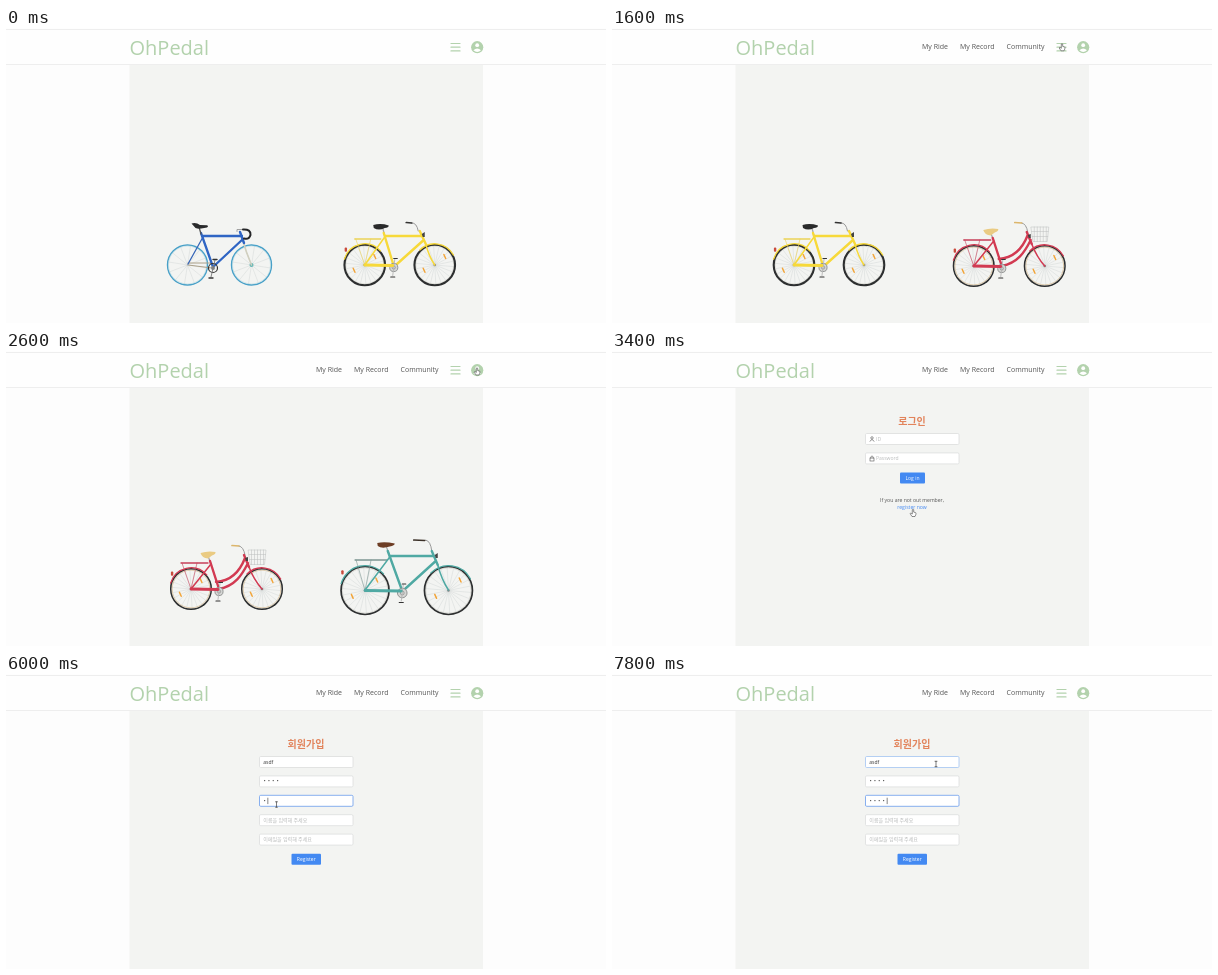
An HTML page for the animation above (8000 ms loop, 600 by 295 pixels).

```html
<!DOCTYPE html>
<html lang="ko">
<head>
<meta charset="utf-8">
<title>Bike club</title>
<style>
html, body { margin: 0; width: 100%; height: 100%; overflow: hidden; background: #fdfdfd; }
svg { display: block; width: 100%; height: 100%; }
text { font-family: "Open Sans", "Noto Sans CJK KR", "Noto Sans CJK JP", sans-serif; white-space: pre; }
</style>
</head>
<body>
<svg id="stage" viewBox="0 0 600 295"></svg>
<script>
const LOOP = 8000, SLOT = 176.75;
const stage = document.getElementById('stage');

// ---------- drawing helpers ----------
const line = (d, color, width = 1) =>
  `<path d="${d}" fill="none" stroke="${color}" stroke-width="${width}" stroke-linecap="round" stroke-linejoin="round"/>`;
const shape = (d, color) => `<path d="${d}" fill="${color}"/>`;
const ring = (x, y, r, color, width) =>
  `<circle cx="${x}" cy="${y}" r="${r}" fill="none" stroke="${color}" stroke-width="${width}"/>`;
const disc = (x, y, r, color) => `<circle cx="${x}" cy="${y}" r="${r}" fill="${color}"/>`;
const box = (x, y, w, h, fill, extra = '') =>
  `<rect x="${x}" y="${y}" width="${w}" height="${h}" fill="${fill}" ${extra}/>`;
const label = (str, x, y, size, color, extra = '') =>
  `<text x="${x}" y="${y}" font-size="${size}" fill="${color}" ${extra}>${str}</text>`;
const centred = 'text-anchor="middle"';
const group = (id, content, extra = '') => `<g id="${id}" ${extra}>${content}</g>`;

// ---------- bikes, placed in the left slot ----------
function spokes(x, y, r, count) {
  let d = '';
  for (let i = 0; i < count; i++) {
    const a = (i + .3) * 2 * Math.PI / count;
    d += `M${x},${y}L${x + r * Math.cos(a)},${y + r * Math.sin(a)}`;
  }
  return line(d, '#c6caca', .35);
}

function cityWheel(x, y, r, rim, tyre) {
  return spokes(x, y, r, 22) + ring(x, y, r - 1.4, rim, .8) + ring(x, y, r, '#2d2f30', tyre) +
    line(`M${x - r * .57},${y + r * .16}l1.8,4M${x + r * .45},${y - r * .52}l1.8,4`, '#f2a53a', 1.5) +
    disc(x, y, 1.3, '#888');
}

function fender(x, y, r, color, from, to) {
  const at = deg => {
    const a = deg * Math.PI / 180;
    return `${x + r * Math.cos(a)},${y + r * Math.sin(a)}`;
  };
  return line(`M${at(from)}A${r},${r} 0 0 1 ${at(to)}`, color, 1.3);
}

function crank(x, y, r) {
  return disc(x, y, r, '#d5d6d4') + ring(x, y, r, '#8a8c8c', .9) + ring(x, y, r * .4, '#888', .7) +
    line(`M${x + 1},${y - 8}L${x - 1},${y + 8}`, '#b5b5b5', .9) +
    line(`M${x},${y - 9}h3.5M${x - 3},${y + 9.5}h4`, '#333', 1.2);
}

function cityBike(b) {
  const { rear, front, y, r, color, rim } = b;
  const legs = `M${rear - 9},${b.rackY}L${rear},${y}M${rear + 6},${b.rackY}L${rear},${y}`;
  return cityWheel(rear, y, r, rim, b.tyre) + cityWheel(front, y, r, rim, b.tyre) +
    fender(rear, y, r + .9, color, 196, 318) + fender(front, y, r + .9, color, 225, 332) +
    line(legs, b.rackColor, .6) + line(`M${rear - 10},${b.rackY}H${b.rackEnd}`, b.rackColor, 1.3) +
    line(b.post, '#aaa', 1.3) + line(b.bars, '#999', 1) +
    line(b.fork, color, 1.5) + line(b.tubes, color, 2.4) +
    crank(b.crankX, y + 2.5, r * .2) +
    line(`M${rear},${y}L${b.crankX - 1},${y + .5}`, color, 2.8) +
    line(b.stay, color, 1.5) +
    shape(b.saddle, b.saddleColor) + line(b.grip, b.gripColor, 1.7) +
    box(rear - r + .2, y - r * .76 - 2, 2.4, 4.2, '#c94a3c', 'rx="1"') +
    shape(b.lamp, '#444') + (b.basket || '');
}

const blueBike = [181.5, 245.5].map(x =>
    spokes(x, 237, 19, 12) + ring(x, 237, 20, '#48a0c8', 1.4) + ring(x, 237, 19, '#a9d3df', .5)).join('') +
  disc(245.5, 237, 2, '#62b7b5') +
  line('M182,237L206,240M182,235L205,235', '#aaa089', 1) +
  line('M197,209L182,236', '#3867b8', 1.3) +
  line('M237,213Q240,224 245.5,237', '#d0cfbf', 1.6) +
  line('M195,205L207,239M196,208H236M237,211L207,239', '#2f65c4', 2.3) +
  line('M234,204L238,215', '#2f65c4', 2.4) + line('M193,199L195,206', '#555', 1.3) +
  shape('M185.5,195.5Q190,194 194,197L201,197.3Q203,198 201,199.5Q193,201.5 189.5,200Z', '#292a2c') +
  line('M231,203.5V201.5H237', '#999', .9) +
  line('M237,201.5Q245,201 244.5,207Q243,212 238,210.5', '#252628', 2) +
  ring(207, 240, 4.5, '#333', 1.2) + disc(207, 240, 2, '#888') +
  line('M209,232L205,249', '#777', .9) + line('M207,231.5h4M203,250h4', '#333', 1.4);

const yellowBike = cityBike({
  rear: 182, front: 252, y: 237, r: 20.3, color: '#f7d93a', rim: '#d8d8d2', tyre: 2.1,
  rackY: 211, rackEnd: 198, rackColor: '#ecd458', crankX: 211,
  post: 'M200,200L202,208', bars: 'M229,195Q234,194.5 235.5,203',
  tubes: 'M201,205L211,238M202,208H239M241,212L212,238M237,203L243,216',
  fork: 'M243,216Q246,228 252,237', stay: 'M202,209L182,237',
  saddleColor: '#292a2b', gripColor: '#333',
  saddle: 'M190.5,197Q198,195 206,197.5Q206,199.5 202,200Q196,203 191,200Z',
  grip: 'M223.5,194.5L229,195', lamp: 'M239,206l3,-2v5h-2z'
});

let wires = 'M242.5,199H260L258.5,213.5H244.5Z';
for (let x = 245.5; x < 259; x += 3) wires += `M${x},199V213.5`;
const redBike = cityBike({
  rear: 185, front: 256, y: 238, r: 20.3, color: '#d23a52', rim: '#d6bd96', tyre: 1.5,
  rackY: 212, rackEnd: 202, rackColor: '#c8405a', crankX: 213,
  post: 'M202,205L205,213', bars: 'M233,195Q237.5,195.5 239,204',
  tubes: 'M204,210L213,238M239,207C234,220 226,230 210,231M242,212C236,224 229,235 213,238M238,204L243,216',
  fork: 'M243,216Q248,229 256,238', stay: 'M205,213L185,238',
  saddleColor: '#eacb83', gripColor: '#dcb66c',
  saddle: 'M194.5,202Q202,199.5 209.5,201Q210,203 206,204.5L202,207.5Q196,207 194.5,202Z',
  grip: 'M226,194.5L233,195', lamp: 'M239,207l3,-1v4h-2z',
  basket: line(wires + 'M243,203.5H259.5M243.5,208.5H259', '#babcbc', .5)
});

const tealBike = cityBike({
  rear: 182.3, front: 265.7, y: 239.5, r: 24, color: '#4fa9a3', rim: '#d5d5cf', tyre: 1.7,
  rackY: 209, rackEnd: 204, rackColor: '#7d9692', crankX: 219.5,
  post: 'M203,194L207,205', bars: 'M243,189Q248,190 249,200',
  tubes: 'M205,200L219.5,240M207,205H251M253,210L220,240M249,200L255,214',
  fork: 'M255,214Q259,229 265.7,239', stay: 'M207,206L182.3,239',
  saddleColor: '#6d3d25', gripColor: '#3b3028',
  saddle: 'M194.5,192Q202,190.5 212,192.5Q212,194.5 207,195.5Q199,198 195,195Z',
  grip: 'M231,189L242,189.5', lamp: 'M252,204l3,-2v5h-2z'
});

const bikes = [blueBike, yellowBike, redBike, tealBike]
  .map((b, i) => `<g transform="translate(${i * SLOT})">${b}</g>`).join('');

// ---------- pages ----------
const GREEN = '#b3d2ad', BLUE = '#4389f2', GREY = '#b9bbbb', INK = '#555';
const fieldY = i => 82.5 + 19.4 * i;
const field = (i, id) =>
  box(253.5, fieldY(i), 93.5, 11, '#fff', `id="${id}" rx="1.2" stroke="#dcdedd" stroke-width=".8"`);
const title = str => label(str, 300, 74, 10, '#e2845c', `${centred} font-weight="700"`);
const button = (str, x, y, w) =>
  box(x, y, w, 11, BLUE, 'rx="1"') + label(str, x + w / 2, y + 7.3, 5, '#fff', centred);

const header = box(0, 0, 600, 37, '#fefefe') +
  line('M0,1.5H600M0,36.5H600', '#eeeeee', 1) +
  label('OhPedal', 123.5, 27, 20, GREEN) +
  group('menu', label('My Ride', 310, 20.6, 7, INK) + label('My Record', 348, 20.6, 7, INK) +
    label('Community', 394.5, 20.6, 7, INK)) +
  line('M445,15.5H454M445,19.2H454M445,22.9H454', GREEN, 1.2) +
  disc(471.2, 19.2, 6.1, GREEN) + disc(471.2, 17.2, 1.9, '#fff') +
  shape('M467.4,22.3Q471.2,18.6 475,22.3Q471.2,25.6 467.4,22.3Z', '#fff');

const login = title('로그인') + field(0, 'loginId') + field(1, 'loginPassword') +
  ring(260, 86.9, 1.2, '#555', .6) + line('M258,90.3Q260,86.5 262,90.3', '#555', .6) +
  box(258, 107, 4, 3, 'none', 'stroke="#555" stroke-width=".6"') +
  line('M258.8,107V105.8Q260,104 261.2,105.8V107', '#555', .6) +
  label('ID', 264, 89.9, 5, GREY) + label('Password', 264, 109.3, 5, GREY) +
  button('Log in', 288, 121.5, 25) +
  label('If you are not out member,', 300, 150.5, 5.1, INK, centred) +
  label('register now', 300, 158.4, 5.1, BLUE, centred);

const hints = ['ID', '비밀번호', '비밀번호 확인', '이름을 입력해 주세요', '이메일을 입력해 주세요'];
const register = title('회원가입') +
  hints.map((hint, i) => field(i, 'field' + i) +
    label(hint, 257.3, fieldY(i) + 7.3, 5, GREY, `id="hint${i}"`) +
    label('', i ? 257.8 : 257.3, fieldY(i) + 7.4, 5, '#333',
      `id="value${i}" ${i ? 'letter-spacing="2.4"' : ''}`)).join('') +
  button('Register', 285.5, 179.7, 29.5) +
  box(0, 0, .6, 6.4, '#333', 'id="caret"') +
  group('tip', label('이 입력란을 작성하세요', 300, 98, 5, '#c9b78c', centred), 'opacity=".4"');

const dialog = box(231, -3, 138, 45, '#fff', 'rx="3" stroke="#ddd" stroke-width=".7"') +
  label('다시 확인해 주세요', 237, 15, 5, INK) + button('확인', 345, 26, 18);

const hand = '<path d="M-.7,-2.8Q0,-3.5 .7,-2.8V-.4L2.7,.2Q3.2,.6 2.8,2.2L2,4H-1L-2.8,1.2Q-2.6,.2 -1.7,.8L-.7,1.5Z" fill="#fff" stroke="#444" stroke-width=".6"/>';
const arrow = '<path d="M0,0V6L1.5,4.7L2.6,7L3.6,6.5L2.6,4.3H4.5Z" fill="#fff" stroke="#333" stroke-width=".6"/>';

stage.innerHTML =
  '<clipPath id="panel"><rect x="123.5" y="37" width="353.5" height="258"/></clipPath>' +
  header + box(123.5, 37, 353.5, 258, '#f3f4f2') +
  group('home', group('track', bikes), 'clip-path="url(#panel)"') +
  group('login', login) + group('register', register) + group('dialog', dialog) +
  group('cursor', group('hand', hand) + group('arrow', arrow) +
    group('beam', line('M-1,-2.7H1M0,-2.7V2.7M-1,2.7H1', '#444', .7)));

// ---------- motion ----------
const el = id => document.getElementById(id);
const show = (id, on) => el(id).setAttribute('display', on ? 'inline' : 'none');
const within = (t, a, b) => t >= a && t < b;
const ease = (t, start, length) => {
  const p = Math.min(1, Math.max(0, (t - start) / length));
  return p * p * (3 - 2 * p);
};

// time, x, y
const cursorPath = [
  [850, 420, 110], [1350, 450, 27], [1450, 450, 18.8], [2350, 450, 18.8], [2600, 471, 20], [2750, 471, 20],
  [3300, 301, 161.5], [3750, 301, 161.5], [4500, 271, 90], [5350, 271, 90],
  [5500, 271, 110], [5700, 271, 110], [5850, 270.5, 130.5], [6350, 270.5, 130.5],
  [6600, 300, 185], [6700, 300, 185], [7000, 354, 32], [7150, 354, 32], [7500, 324, 90]
];
function cursorAt(t) {
  const next = cursorPath.findIndex(k => k[0] > t);
  if (next < 0) return cursorPath[cursorPath.length - 1].slice(1);
  const a = cursorPath[Math.max(0, next - 1)], b = cursorPath[next];
  const p = ease(t, a[0], b[0] - a[0]);
  return [a[1] + (b[1] - a[1]) * p, a[2] + (b[2] - a[2]) * p];
}

const typed = (t, start, step) => Math.max(0, Math.min(4, Math.floor((t - start) / step) + 1));

function drawForm(t, x, y) {
  const counts = [typed(t, 5080, 80), typed(t, 5520, 70), typed(t, 5950, 110), 0, 0];
  const focus = t < 4650 ? -1 : t < 5450 ? 0 : t < 5850 ? 1 : 2;
  let overField = false;
  counts.forEach((n, i) => {
    el('value' + i).textContent = i ? '•'.repeat(n) : 'asdf'.slice(0, n);
    show('hint' + i, !n);
    const top = fieldY(i), hover = x > 253 && x < 347 && y > top && y < top + 11;
    overField = overField || hover;
    el('field' + i).setAttribute('stroke',
      i === focus ? (t < 5080 ? '#777' : '#6a9cec') : hover ? '#a3c4f3' : '#dcdedd');
  });
  show('caret', focus >= 0);
  if (focus >= 0) {
    el('caret').setAttribute('x', 257.2 + counts[focus] * (focus ? 4.4 : 2.6));
    el('caret').setAttribute('y', fieldY(focus) + 2.4);
  }
  show('tip', within(t, 4850, 5060));
  return overField;
}

function draw(t) {
  show('home', t < 2700);
  show('login', within(t, 2700, 3800));
  show('register', t >= 3800);
  show('dialog', within(t, 6750, 7150));
  show('menu', within(t, 1480, 1900) || t >= 2300);
  const slide = ease(t, 500, 300) + ease(t, 1660, 300);
  el('track').setAttribute('transform', `translate(${-slide * SLOT})`);

  const [x, y] = cursorAt(t);
  const beam = t >= 3800 && drawForm(t, x, y);
  const pointing = within(t, 1400, 2750) || within(t, 3200, 3800) || within(t, 6570, 6750);
  show('cursor', t >= 850);
  show('beam', beam);
  show('hand', pointing && !beam);
  show('arrow', !pointing && !beam);
  el('cursor').setAttribute('transform', `translate(${x},${y})`);
}

const start = performance.now();
function tick() {
  draw((performance.now() - start) % LOOP);
  requestAnimationFrame(tick);
}
tick();
</script>
</body>
</html>
```
